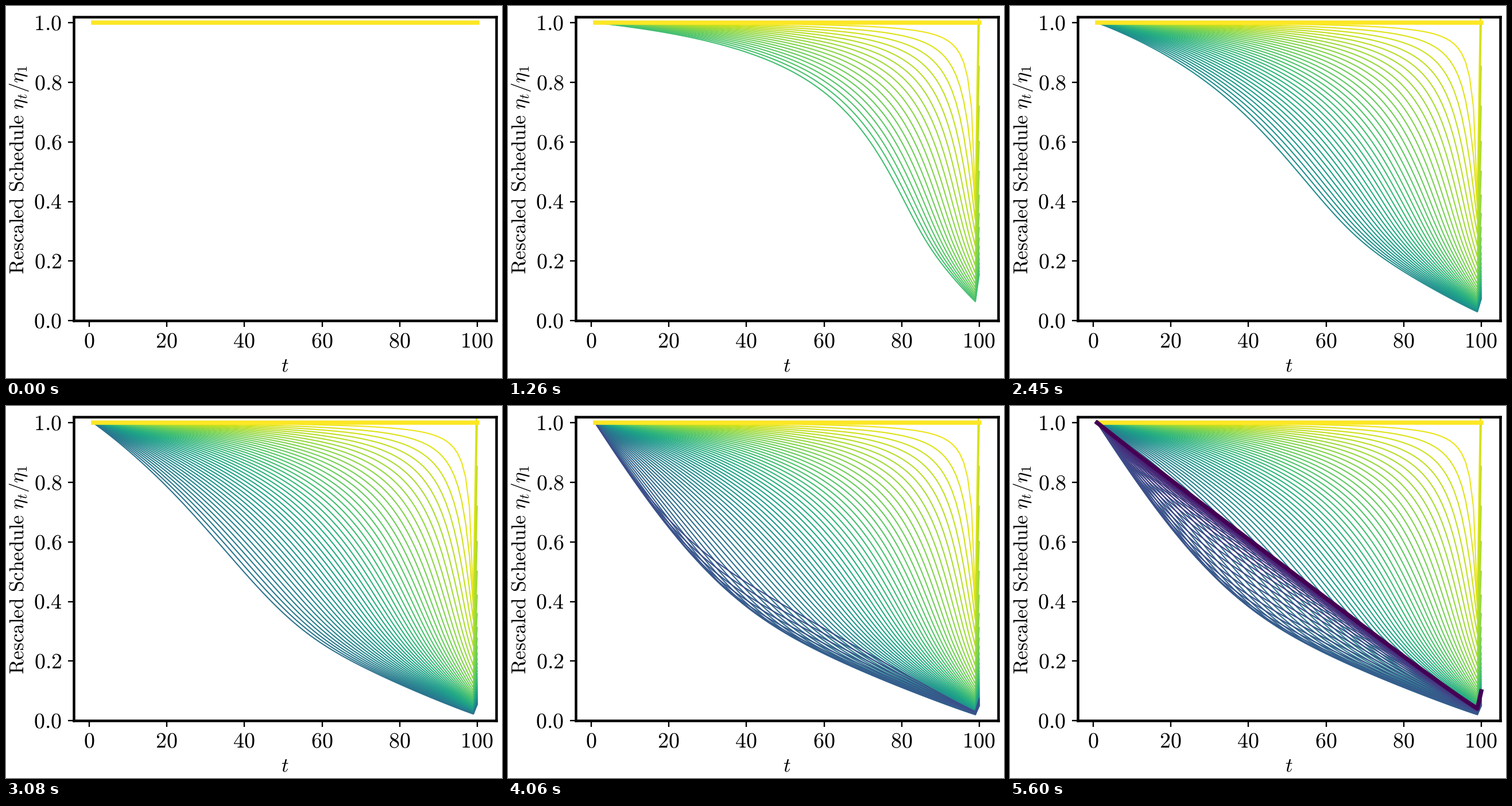
Animation of 864 by 648 pixels, one loop 8000 ms. Source, as a matplotlib script:

```python
import numpy as np
import matplotlib.pyplot as plt
from matplotlib.animation import FuncAnimation
from matplotlib.collections import LineCollection

plt.rcParams["mathtext.fontset"] = "cm"
plt.rcParams["text.hinting"] = "none"

W, H, DPI = 864, 648, 216
T, STEPS, SUB = 100, 80, 80
STEP_MS, TICK_MS, LOOP_MS = 70, 40, 8000

# (iteration, t, height) and (t, lowest height) that pin down the descent
ANCHORS = [(1, 90, .957), (1, 95, .897), (1, 98, .714),
           (10, 40, .957), (10, 60, .90), (10, 80, .715),
           (27, 20, .928), (27, 40, .80), (27, 60, .55),
           (44, 20, .752), (44, 40, .435), (44, 60, .235),
           (58, 40, .517), (58, 60, .355), (67, 40, .595)]
FLOOR = [(20, .63), (30, .47), (40, .365), (60, .221)]


def gradient(eta, dist):
    """Gradient of dist^2/S + eta_T + sum_k eta_k^2 / sum_{j>k} eta_j."""
    tail = np.cumsum(eta[:, ::-1], axis=1)[:, ::-1]
    ratio = eta[:, :-1] / tail[:, 1:]
    g = np.ones_like(eta)
    g[:, :-1] = 2 * ratio
    g[:, 1:] -= np.cumsum(ratio * ratio, axis=1)
    return g - (dist / tail[:, :1]) ** 2


def descend(params):
    """Rescaled schedules of every iteration, one row per parameter set."""
    log_rate, log_dist, growth, power = params.T[:, :, None]
    dist = np.exp(log_dist)
    eta = np.ones((len(params), T))
    path = [eta]
    even = np.full(SUB, 1 / SUB)
    first = np.append(.88, np.full(SUB // 8, .12 / (SUB // 8)))
    for k in range(STEPS):
        rate = np.exp(log_rate + growth * k / STEPS)
        for size in (even if k else first):
            step = size * rate * eta ** power
            eta = np.maximum(eta - step * gradient(eta, dist), 1e-4)
        path.append(eta / eta[:, :1])
    return np.array(path)


def residuals(paths):
    it, t, height = np.array(ANCHORS).T
    low_t, low = np.array(FLOOR).T
    at = paths[it.astype(int), :, t.astype(int) - 1] - height[:, None]
    below = paths.min(axis=0)[:, low_t.astype(int) - 1].T - low[:, None]
    return np.vstack([at, below]).T


def fit(rounds=8, eps=.02):
    """Damped Gauss-Newton on log rate, log distance, growth and power."""
    p = np.array([np.log(.48), np.log(1.8), 0, 0])
    lo = np.array([-1.4, -.2, -.8, 0])
    hi = np.array([-.2, 1.2, .8, 1])
    best, curves = np.inf, None
    for _ in range(rounds):
        paths = descend(p + eps * np.eye(5, 4, -1))
        r = residuals(paths)
        if r[0] @ r[0] < best:
            best, curves = r[0] @ r[0], paths[:, 0]
        J = (r[1:] - r[0]) / eps
        move = np.linalg.solve(J @ J.T + .003 * np.eye(4), J @ r[0])
        p = np.clip(p - np.clip(move, -.2, .2), lo, hi)
    return curves


curves = fit()
t = np.arange(1, T + 1)
segments = [np.column_stack([t, c]) for c in curves]
colors = plt.cm.viridis(1 - (np.arange(STEPS + 1) / STEPS) ** .8)

fig = plt.figure(figsize=(W / DPI, H / DPI), dpi=DPI, facecolor="white")
L, R, TOP, BOT = 118.3, 854.3, 18.7, 548.3
ax = fig.add_axes([L / W, 1 - BOT / H, (R - L) / W, (BOT - TOP) / H])
ax.set(xlim=(-3.95, 104.95), ylim=(0, 1.02),
       xticks=range(0, 101, 20), yticks=np.arange(6) / 5)
ax.tick_params(length=3.5, width=.8, labelbottom=False, labelleft=False)
for spine in ax.spines.values():
    spine.set_linewidth(1.5)


def label(x, y, s, size, ha="center", **kw):
    fig.text(x / W, 1 - y / H, f"${s}$", fontsize=size, ha=ha,
             va="baseline", **kw)


for v in range(0, 101, 20):
    px = L + (v + 3.95) / 108.9 * (R - L)
    py = BOT - v / 102 * (BOT - TOP)
    label(px - .7, 595.5, v, 12.68)
    label(97.5, py + 13, f"{v / 100:.1f}", 12.68, ha="right")
label(485.5, 637.5, "t", 11.7)
label(32, 285, r"\mathrm{Rescaled\ Schedule}\ \eta_t/\eta_1", 11.7,
      rotation=90, rotation_mode="anchor")

thin = LineCollection([], colors=colors[1:], linewidths=.7, zorder=2,
                      capstyle="projecting", joinstyle="round")
ax.add_collection(thin, autolim=False)
ax.plot(t, curves[0], color=colors[0], lw=2.5, zorder=2.2)
final, = ax.plot(t, curves[-1], color=colors[-1], lw=2.5, zorder=2.3,
                 visible=False)


def update(i):
    n = min((i * TICK_MS + 30) // STEP_MS, STEPS)
    thin.set_segments(segments[1:min(n, STEPS - 1) + 1])
    final.set_visible(n == STEPS)
    return thin, final


anim = FuncAnimation(fig, update, frames=LOOP_MS // TICK_MS,
                     interval=TICK_MS, repeat=True, repeat_delay=0)
plt.show()
```
